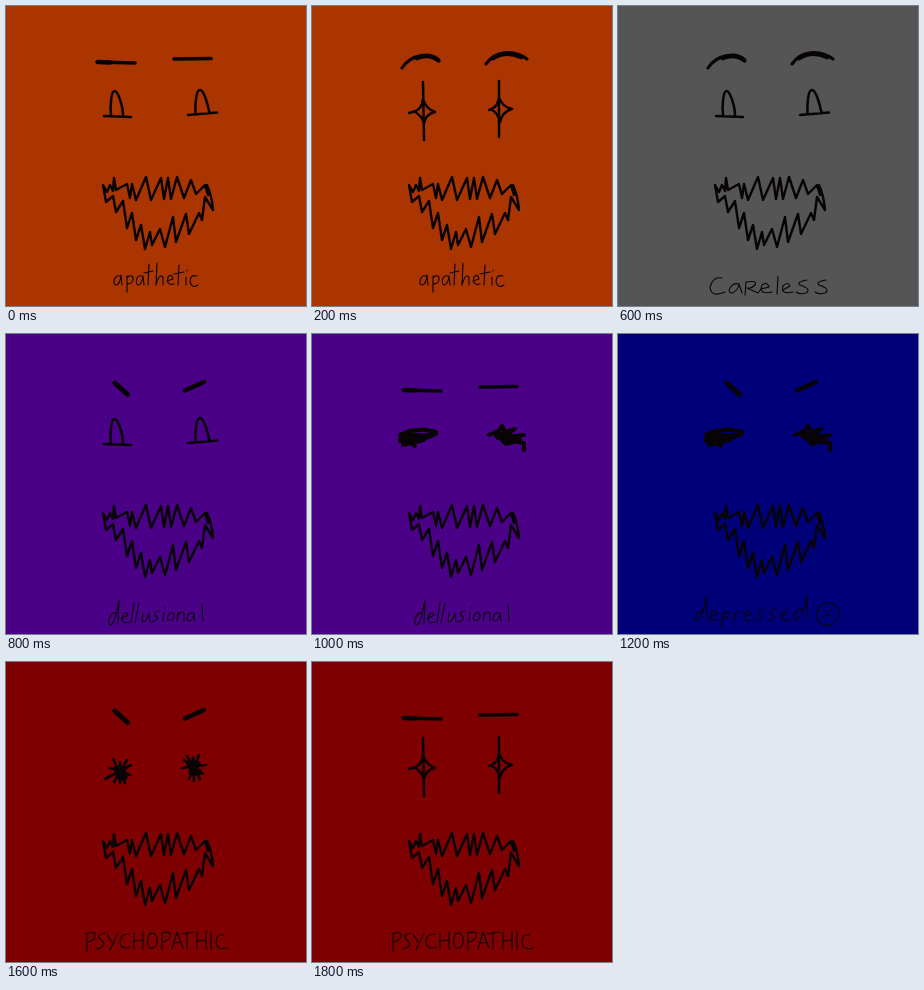
These frames come from a looping animation (300x300 px, 2 s). An HTML page with a canvas:

```html
<!DOCTYPE html>
<html lang="en">
<head>
<meta charset="utf-8">
<title>Moods</title>
<style>
html, body { margin: 0; width: 100%; height: 100%; overflow: hidden; }
canvas { display: block; }
</style>
</head>
<body>
<canvas id="stage" width="300" height="300"></canvas>
<script>
const ctx = document.getElementById('stage').getContext('2d');
ctx.lineCap = ctx.lineJoin = 'round';

// Every part is a list of [stroke width, path].
const mouth = [[2.4, `M97 179L101 186L104 179L107 185L108 172L110 184L121 178L124 192L126 178L130 194L140 171
  L145 194L155 172L158 193L162 172L165 193L171 171L178 192L185 174L190 188L199 179L202 189L201 179Q206 190 207 204L199 191
  L196 214L193 207L183 228L180 208L170 236L167 211L159 241L154 223L146 239L144 226L139 243L135 219L130 234
  L126 207L121 222L117 195L110 206L107 190L100 196L97 179`]];

const brows = {
  flat: [[3.6, 'M91 56L129 57M168 53L205 52.5'], [4.6, 'M92 56L104 56.5']],
  arched: [[3.2, 'M90 62C99 48 117 46 127 55M174 58C183 45 201 43 215 53'], [4.6, 'M105 52Q117 47 126 54M181 52Q194 44 209 51']],
  angry: [[5, 'M109 49L121.5 60.5'], [4.6, 'M179 56.5L198 48']]
};

const eyes = {
  lids: [[2.5, `M98 110L125 111M105 109C104 101 105 85 108.5 85C112 85 117 100 117 109
    M182 109L211 106.5M189.5 108C189 98 190 84 194 84C198 84 202 99 203.5 107`]],
  stars: [[2.5, `M111 76L112 134M97 107L104 105Q110 102 111 93Q114 103 123 106Q114 108 112 117Q109 109 103 106
    M187 75L187 131M177 104L181 102Q186 100 187 91Q190 101 200 103Q190 106 188 116Q186 107 180 104`]],
  scribbles: [[4, `M88 101L97 97L112 95.5L124 98L119 102L89 100L88 107L114 104L124 100L92 104L91 111L112 106L97 108L103 112
    M177 101L188 96L184 102L190 92L193 98L203 95L191 104L212 101L186 104L206 108L183 98L208 106L194 110L190 106L212 109L212 116`]],
  bursts: [[2.6, `M107 97L119 121M121 98L108 120M99 117L125 103M104 106L124 113M114 100L114 121
    M181 94L194 117M193 93L183 117M176 106L200 103M178 98L197 112M187 95L188 119`],
    [7, 'M111 107L117 108L113 114L118 115M184 102L191 102L186 109L192 110']]
};

const words = {
  apathetic: `M114 270c-6-2-8 9-4 9c3 0 5-6 5-10l1 10M121 270L121 286M121 272C125 267 129 271 126 276Q124 279 121 277
    M136 270c-6-2-7 8-4 9c3 0 5-6 5-9l1 9M143 258L142 279M138 267L147 265M151 257L150 279Q153 267 157 271L157 279
    M161 275L167 273Q166 267 162 271Q160 280 168 278M173 259L172 279M168 268L178 266M180 271v8M181 264v1
    M191 270Q184 268 184 276Q186 283 192 279`,
  careless: `M104 272Q95 270 92 281Q93 292 107 286M121 278c-7-2-13 7-8 9c4 0 8-5 8-9l3 9
    M127 289L128 276Q140 274 137 279Q133 283 129 282L140 287L143 283L151 281Q149 275 144 279Q140 289 154 286
    M160 270L159 288M165 284L172 280Q170 275 165 280Q162 289 175 286M189 274Q178 276 182 279Q194 283 188 287Q182 289 178 286
    M208 274Q197 276 201 279Q213 283 207 287Q201 289 197 286`,
  dellusional: `M110 279c-6-1-9 9-6 12c4 0 6-9 9-25l-1 24M115 285L122 281Q120 276 117 281Q114 291 123 288
    M128 268L125 289M133 269L129 289M137 279L136 287Q140 290 143 279L144 288M153 277Q146 278 150 282Q154 286 146 288
    M158 278L157 287M159 273v1M166 278Q160 281 162 286Q168 288 168 281Q168 278 165 279M171 287L172 278M172 281Q177 275 178 280L178 287
    M187 279c-6-1-8 8-4 8c3 0 5-4 5-8l1 8M196 270L197 287`,
  depressed: `M86 277c-6-1-11 8-9 10c4 0 10-11 11-25l2 25M92 283L99 280Q98 275 94 278Q90 288 100 286M105 278L103 293
    M105 280Q112 275 111 281Q108 286 104 284M116 279L116 287M116 282Q120 276 123 279M126 283L133 280Q131 275 127 279Q124 289 135 286
    M146 275Q138 277 142 281Q147 285 138 287M158 275Q150 277 154 281Q159 285 150 287M162 283L169 280Q168 275 164 278Q160 288 171 286
    M185 275c-7-1-11 9-8 11c4 0 9-9 12-24l1 23M199 277C202 268 216 266 220 275C224 286 214 293 206 291C198 288 197 281 201 274
    M206 276v2M213 275v2M205 284Q209 277 214 283`,
  psychopathic: `M81 271L81 289M80 272Q91 268 89 275Q87 279 82 280M99 271Q89 273 95 278Q102 284 91 287
    M101 272L106 280M112 271L104 288M123 272Q114 272 114 280Q115 288 124 285M128 271V287M137 270V287M128 279L137 278
    M144 271Q139 280 144 286Q152 287 151 276Q149 269 144 272M156 288V271Q166 268 164 275Q162 279 157 280
    M166 287L171 270L177 286M168 281L175 280M181 271V287M175 272L188 270M191 270V287M200 269V287M191 279L200 278
    M205 270V287M218 273Q210 272 210 280Q211 289 221 286`
};

const moods = [
  ['#aa3500', 'apathetic', ['flat', 'lids'], ['arched', 'stars']],
  ['#555555', 'careless', ['arched', 'scribbles'], ['arched', 'lids']],
  ['#4b0088', 'dellusional', ['angry', 'lids'], ['flat', 'scribbles']],
  ['#000078', 'depressed', ['angry', 'scribbles'], ['flat', 'bursts']],
  ['#7e0000', 'psychopathic', ['angry', 'bursts'], ['flat', 'stars']]
];

function ink(part) {
  for (const [width, path] of part) {
    ctx.lineWidth = width;
    ctx.stroke(new Path2D(path));
  }
}

function draw(now) {
  const step = Math.floor(now % 2000 / 200);
  const [color, word, ...poses] = moods[step >> 1];
  const [brow, eye] = poses[step % 2];
  ctx.fillStyle = color;
  ctx.fillRect(0, 0, 300, 300);
  ctx.strokeStyle = '#080406';
  [brows[brow], eyes[eye], mouth, [[1.1, words[word]]]].forEach(ink);
  requestAnimationFrame(draw);
}
draw(performance.now());
</script>
</body>
</html>
```
